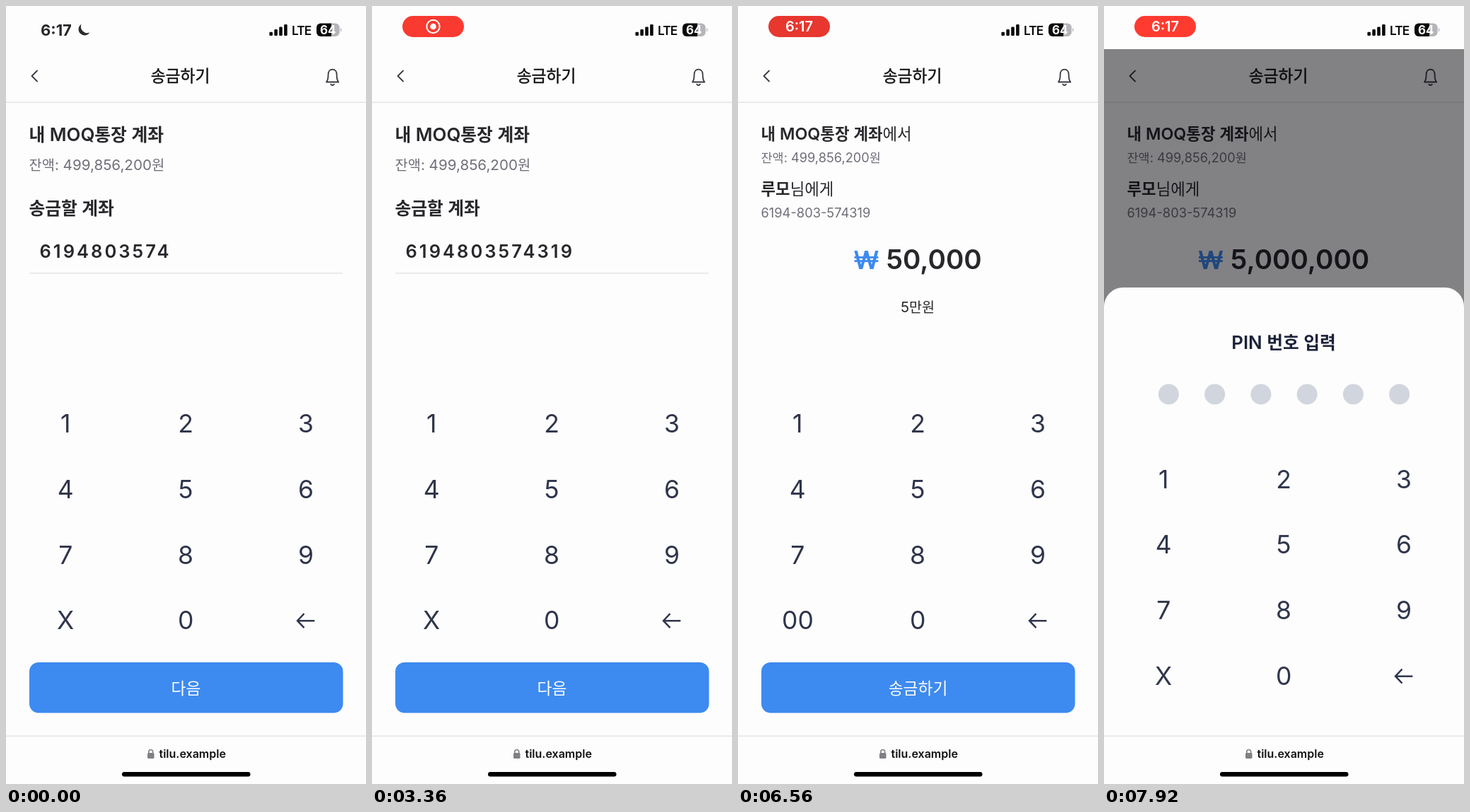
An HTML page that plays this animation: 509x1100 px, repeating every 8 s.

```html
<!DOCTYPE html>
<html lang="ko">
<head>
<meta charset="utf-8">
<title>송금하기</title>
<style>
  html, body { margin: 0; width: 100%; height: 100%; overflow: hidden; background: #fdfdfd; }
  svg { display: block; width: 509px; height: 1100px; }
  text { font-family: Inter, "Noto Sans CJK KR", "Noto Sans CJK JP", "Noto Sans CJK", sans-serif; fill: #28282c; }
  .k { font-size: .96em; }
  .mid { text-anchor: middle; }
  .b { font-weight: 600; }
  .r { font-weight: 400; }
  .m { font-weight: 500; fill: #111; stroke: #111; stroke-width: .4px; }
  .soft { fill: #6f6f79; }
  .white { fill: #fff; }
  .key { font-size: 35.5px; fill: #2f354b; text-anchor: middle; }
  .won { font-size: 36px; fill: #3d8af0; }
  .line { fill: none; stroke: #e6e6e9; stroke-width: 1.4; }
  .icon { fill: none; stroke: #3a3a42; stroke-width: 1.8; stroke-linecap: round; stroke-linejoin: round; }

  #pill { animation: pulse 8s ease-in-out infinite; }
  #shade { animation: shade 8s linear infinite; }
  #sheet { animation: rise 8s infinite; }

  @keyframes pulse {
    0%, 6.75%, 33%, 59.4%, 85.6% { fill: #e3362e; }
    19.9%, 46.25%, 72.5%, 98.75%, 100% { fill: #ff3b30; }
  }
  @keyframes shade {
    0%, 95.05% { opacity: 0; }
    96% { opacity: .454; }
    99%, 100% { opacity: .492; }
  }
  @keyframes rise {
    0% { transform: translateY(1032px); }
    95.05% { transform: translateY(1032px); animation-timing-function: cubic-bezier(.32, .72, 0, 1); }
    100% { transform: translateY(395px); }
  }
</style>
</head>
<body>
<svg viewBox="0 0 509 1100" xmlns="http://www.w3.org/2000/svg">
  <rect width="509" height="1100" fill="#fdfdfd"/>

  <!-- header and keypad shared by both steps -->
  <g data-on="0 3840 4880 8000">
    <path class="icon" d="M44 91.5 36.500 99l7.500 7.500"/>
    <text class="mid m" x="246.500" y="107" font-size="23.700">송금하기</text>
    <path class="icon" d="M453 107.500c2-2.200 2.600-4 2.600-10.500 0-4.500 2.400-7.300 6-7.300s6 2.800 6 7.300c0 6.500.6 8.300 2.600 10.500zM459.300 110.800c1 1.600 3.600 1.600 4.600 0"/>
    <path class="line" d="M0 136.300H509"/>
    <g id="pad"></g>
  </g>

  <!-- step one: account number -->
  <g data-on="0 3840">
    <text class="b" x="32.500" y="191" font-size="25.800">내 MOQ통장 계좌</text>
    <text class="soft" x="32.500" y="232" font-size="20.600">잔액: 499,856,200원</text>
    <text class="b" x="32.500" y="295" font-size="25.800">송금할 계좌</text>
    <text class="b" x="47.500" y="355.500" font-size="25.500" letter-spacing="3.050">6194803574<tspan data-on="720 8000">3</tspan><tspan data-on="1440 8000">1</tspan><tspan data-on="2160 8000">9</tspan></text>
    <path class="line" d="M33 377.700H476"/>
    <text class="key" x="84" y="881">X</text>
    <rect x="33" y="928" width="443.500" height="71.500" rx="13" fill="#3d8af0"/>
    <text class="mid white" x="254.500" y="972.500" font-size="23.700">다음</text>
  </g>

  <!-- step two: amount -->
  <g data-on="4880 8000">
    <text class="b" x="32.500" y="189" font-size="23.300">내 MOQ통장 계좌<tspan class="r">에서</tspan></text>
    <text class="soft" x="32.500" y="220.500" font-size="18.200">잔액: 499,856,200원</text>
    <text x="32.500" y="267" font-size="23.300"><tspan class="b">루모</tspan>님에게</text>
    <text class="soft" x="32.500" y="298.500" font-size="18.300">6194-803-574319</text>
    <text class="mid b" x="254" y="364" font-size="31" style="fill:#111" data-on="0 6000">얼마나 보낼까요?</text>
    <g id="amounts"></g>
    <text class="key" x="84.500" y="881">00</text>
    <g data-on="0 6000">
      <rect x="33" y="928" width="443.500" height="71.500" rx="13" fill="#f3f3f8"/>
      <text class="mid" x="254.500" y="972.500" font-size="23.700" style="fill:#a0a0ab">송금하기</text>
    </g>
    <g data-on="6000 8000">
      <rect x="33" y="928" width="443.500" height="71.500" rx="13" fill="#3d8af0"/>
      <text class="mid white" x="254.500" y="972.500" font-size="23.700">송금하기</text>
    </g>
  </g>

  <!-- tap highlight -->
  <rect data-on="3040 3360 7440 7570" x="30" y="925" width="449.500" height="77.500" rx="16" fill-opacity=".25"/>

  <rect id="shade" y="61" width="509" height="971" fill="#040006"/>
  <g id="sheet">
    <rect width="509" height="720" rx="27" fill="#fdfdfd"/>
    <text class="mid b" x="254" y="87" font-size="25.800" style="fill:#1b2138">PIN 번호 입력</text>
    <g id="dots" fill="#d1d5de"></g>
    <g id="pinPad"></g>
    <text class="key" x="84" y="561.500">X</text>
  </g>

  <!-- status bar -->
  <g data-on="0 440">
    <text x="49" y="41.500" font-size="22" font-weight="700">6:17</text>
    <path fill="#2b2b30" d="M106.500 25.800a8.500 8.500 0 1 0 11.800 11.600 9 9 0 0 1-11.800-11.600z"/>
  </g>
  <g data-on="440 8000">
    <rect id="pill" x="43" y="14" width="87" height="30" rx="15"/>
    <g data-on="0 3440">
      <circle cx="86.500" cy="29" r="9.200" fill="none" stroke="#fff" stroke-width="2"/>
      <circle cx="86.500" cy="29" r="4.300" fill="#fff"/>
    </g>
    <text class="mid b white" x="86.500" y="36.200" font-size="20" data-on="3440 8000">6:17</text>
  </g>
  <g id="bars"></g>
  <text class="b" x="404" y="40.700" font-size="17.300" letter-spacing="-.9" style="fill:#0a0a0a">LTE</text>
  <path fill="#0a0a0a" d="M460 24.500v18.500h-15a6 6 0 0 1-6-6v-6.500a6 6 0 0 1 6-6z"/>
  <path fill="#b5b5b9" d="M460 24.500h5.700a6 6 0 0 1 6 6v6.500a6 6 0 0 1-6 6h-5.700zM473 31c2 1 2 4.500 0 5.500z"/>
  <text class="mid white" x="455.200" y="40" font-size="17" font-weight="700">64</text>

  <!-- browser bar -->
  <rect y="1032" width="509" height="68" fill="#fdfdfd"/>
  <path class="line" d="M0 1032.300H509"/>
  <rect x="200" y="1056" width="9.500" height="8" rx="1.500" fill="#808084"/>
  <path d="M201.800 1057v-2.500a2.950 2.950 0 0 1 5.900 0v2.500" fill="none" stroke="#808084" stroke-width="1.600"/>
  <text class="b" x="216.500" y="1063" font-size="16" style="fill:#111">tilu.example</text>
  <rect x="164" y="1083" width="181.500" height="6.500" rx="3.250"/>
</svg>
<script>
  const LOOP = 8000;
  const $ = id => document.getElementById(id);

  // digits 1-9, 0 and the delete arrow; y is the centre of the first row
  function keypad(y) {
    const pitch = 92.8;
    let out = '';
    for (let n = 1; n <= 10; n++) {
      const i = n === 10 ? 10 : n - 1;
      const row = Math.floor(i / 3);
      out += `<text class="key" x="${84.3 + i % 3 * 169.8}" y="${y + row * pitch + 13}">${n % 10}</text>`;
    }
    return out + `<path transform="translate(424 ${y + 3 * pitch + .8})" fill="none" stroke="#2f354b"
      stroke-width="2.4" d="M12.300 0H-11.500M-2.500-10-12 0l9.500 10"/>`;
  }
  $('pad').innerHTML = keypad(590);
  $('pinPad').innerHTML = keypad(270.5);

  const repeat = (n, make) => Array.from({ length: n }, (_, i) => make(i)).join('');
  $('dots').innerHTML = repeat(6, i => `<circle cx="${91.4 + i * 65.25}" cy="151" r="14.500"/>`);
  $('bars').innerHTML = repeat(4, i => {
    const h = 5.3 + i * 3.6;
    return `<rect x="${372.4 + i * 6.9}" y="${42 - h}" width="4.600" height="${h}" rx="1.300" fill="#0a0a0a"/>`;
  });

  const amounts = [
    [6000, '5', '5원'],
    [6320, '500', '500원'],
    [6560, '50,000', '5만원'],
    [6800, '5,000,000', '500만원']
  ];
  $('amounts').innerHTML = amounts.map(([from, sum, words], i) => {
    const to = i < 3 ? amounts[i + 1][0] : LOOP;
    return `<g data-on="${from} ${to}">
      <text class="mid b" x="254" y="372" font-size="38.500"><tspan class="won">₩</tspan> ${sum}</text>
      <text class="mid" x="254" y="433" font-size="20.400">${words}</text></g>`;
  }).join('');

  // Hangul is set a little smaller than the Latin beside it
  document.querySelectorAll('text').forEach(el => {
    el.innerHTML = el.innerHTML.replace(/[가-힣]+/g, '<tspan class="k">$&</tspan>');
  });

  // data-on lists the times in ms at which a part switches on, off, on ...
  // Text pieces have no opacity of their own, so they switch their fill.
  let css = '';
  document.querySelectorAll('[data-on]').forEach((el, i) => {
    const prop = el.tagName === 'tspan' ? 'fill-opacity' : 'opacity';
    const steps = el.dataset.on.split(' ').map((ms, n) => `${ms / LOOP * 100}% { ${prop}: ${1 - n % 2} }`);
    css += `@keyframes on${i} { 0% { ${prop}: 0 } ${steps.join(' ')} }\n`;
    el.style.animation = `on${i} ${LOOP}ms step-end infinite`;
  });
  document.head.appendChild(document.createElement('style')).textContent = css;
</script>
</body>
</html>
```
